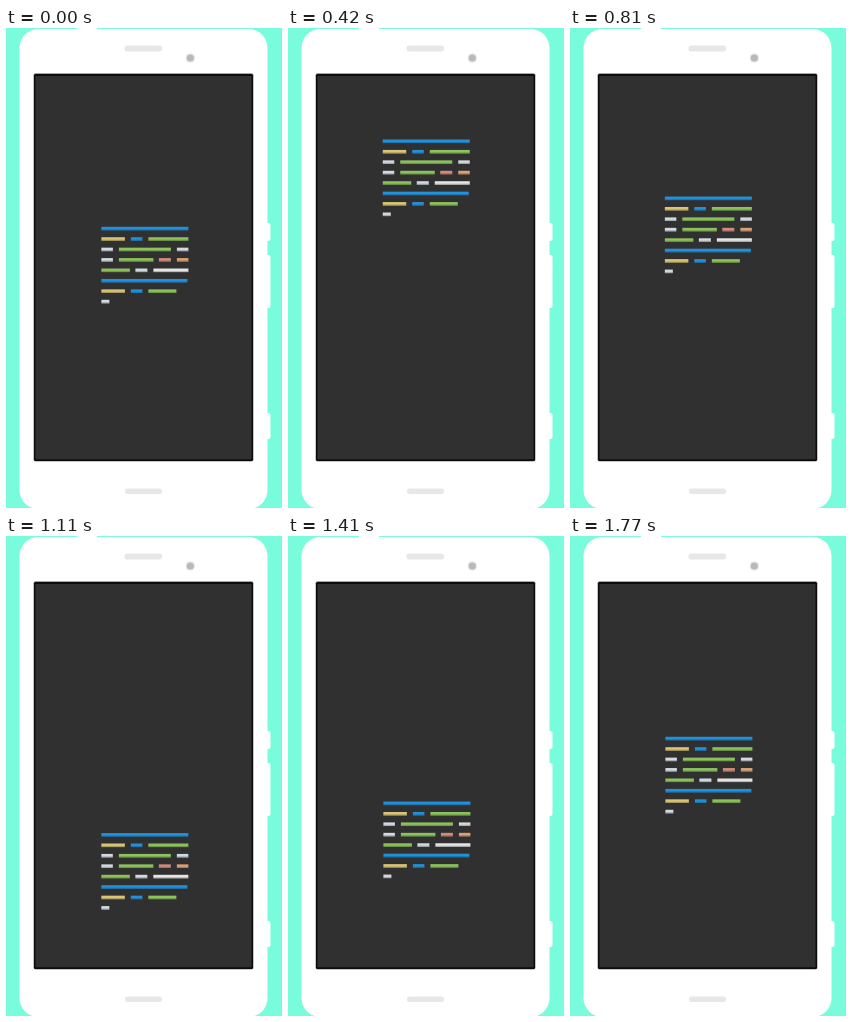
Write an HTML page with a canvas that moves like this. It is 276x480 px and loops after 1800 ms.

```html
<!DOCTYPE html>
<html lang="en">
<head>
<meta charset="utf-8">
<title>Phone with scrolling code</title>
<style>
html, body { margin: 0; width: 100%; height: 100%; overflow: hidden; background: #78fcdc; }
canvas { display: block; width: 276px; height: 480px; }
</style>
</head>
<body>
<canvas id="stage" width="276" height="480"></canvas>
<script>
const ctx = document.getElementById('stage').getContext('2d');
const LOOP = 1800, STEP = 30;

const BLUE = '#2291dc', TAN = '#d9c576', GREEN = '#8cc25a', LIGHT = '#d3d9de',
      WHITE = '#e6e6e6', RED = '#d38a78', ORANGE = '#dba075';

// Each line of code: [left, width, colour] per word
const lines = [
  [[0, 87, BLUE]],
  [[0, 23.5, TAN], [29.5, 11.5, BLUE], [47, 40, GREEN]],
  [[0, 11.5, LIGHT], [17.5, 52, GREEN], [75.5, 11.5, LIGHT]],
  [[0, 11.5, LIGHT], [17.5, 34.5, GREEN], [57.5, 12, RED], [75.5, 11.5, ORANGE]],
  [[0, 28.5, GREEN], [34, 12, LIGHT], [52, 35, WHITE]],
  [[0, 86, BLUE]],
  [[0, 23.5, TAN], [29.5, 11.5, BLUE], [47, 28, GREEN]],
  [[0, 8, LIGHT]]
];

// Keys: time, offset, speed on leaving, speed on arriving
const keys = [
  { t: 0, y: 0, out: -0.19, into: 0 },
  { t: 590, y: -101, out: 0, into: 0 },
  { t: 1140, y: 100, out: 0, into: 0 },
  { t: LOOP, y: 0, out: 0, into: -0.05 }
];

function offsetY(t) {
  let i = 0;
  while (i < keys.length - 2 && t >= keys[i + 1].t) i++;
  const a = keys[i], b = keys[i + 1], d = b.t - a.t, x = (t - a.t) / d;
  const s = x * x * (3 - 2 * x);
  return a.y + (b.y - a.y) * s
    + d * a.out * x * (1 - x) * (1 - x)
    + d * b.into * x * x * (x - 1);
}

function offsetX(t) {
  if (t > 1140) return 0;
  return -0.7 * Math.sin(Math.PI * t / 1140);
}

function box(x, y, w, h, r, fill) {
  ctx.fillStyle = fill;
  ctx.beginPath();
  ctx.roundRect(x, y, w, h, r);
  ctx.fill();
}

function dot(x, y, r, fill) {
  ctx.fillStyle = fill;
  ctx.beginPath();
  ctx.arc(x, y, r, 0, Math.PI * 2);
  ctx.fill();
}

function drawPhone() {
  ctx.fillStyle = '#78fcdc';
  ctx.fillRect(0, 0, 276, 480);
  box(13.5, 1, 248, 480, 19, '#fff');
  box(71, -3, 20, 6, 2, '#fff');
  box(258, 195, 6.5, 18, 2, '#fff');
  box(258, 227, 6.5, 53, 2, '#fff');
  box(258, 385, 6.5, 26, 2, '#fff');
  box(118.5, 17.5, 37.5, 6, 2.5, '#e7e7e7');
  box(119, 460.5, 37, 5.5, 2.5, '#e7e7e7');
  dot(184.3, 30, 4.8, '#e9e9e9');
  dot(184.3, 30, 3.6, '#b9b9b9');
  box(27.5, 45.3, 220, 388.2, 2, '#8a8a8a');
  box(28, 46, 219, 387, 1.5, '#0c0c0c');
  box(29.5, 48, 216, 383.2, 0, '#303030');
}

function drawCode(t) {
  const left = 95.4 + offsetX(t), top = 198.8 + offsetY(t);
  lines.forEach((words, row) => {
    const y = top + row * 10.43;
    for (const [x, w, fill] of words) {
      ctx.fillStyle = fill;
      ctx.fillRect(left + x, y, w, 3.6);
      ctx.fillStyle = 'rgba(35,40,45,.25)';
      ctx.fillRect(left + x, y + 2.4, w, 1.2);
    }
  });
}

const start = performance.now();
function frame() {
  const t = (performance.now() - start) % LOOP;
  drawPhone();
  drawCode(Math.floor(t / STEP) * STEP);
  requestAnimationFrame(frame);
}
frame();
</script>
</body>
</html>
```
